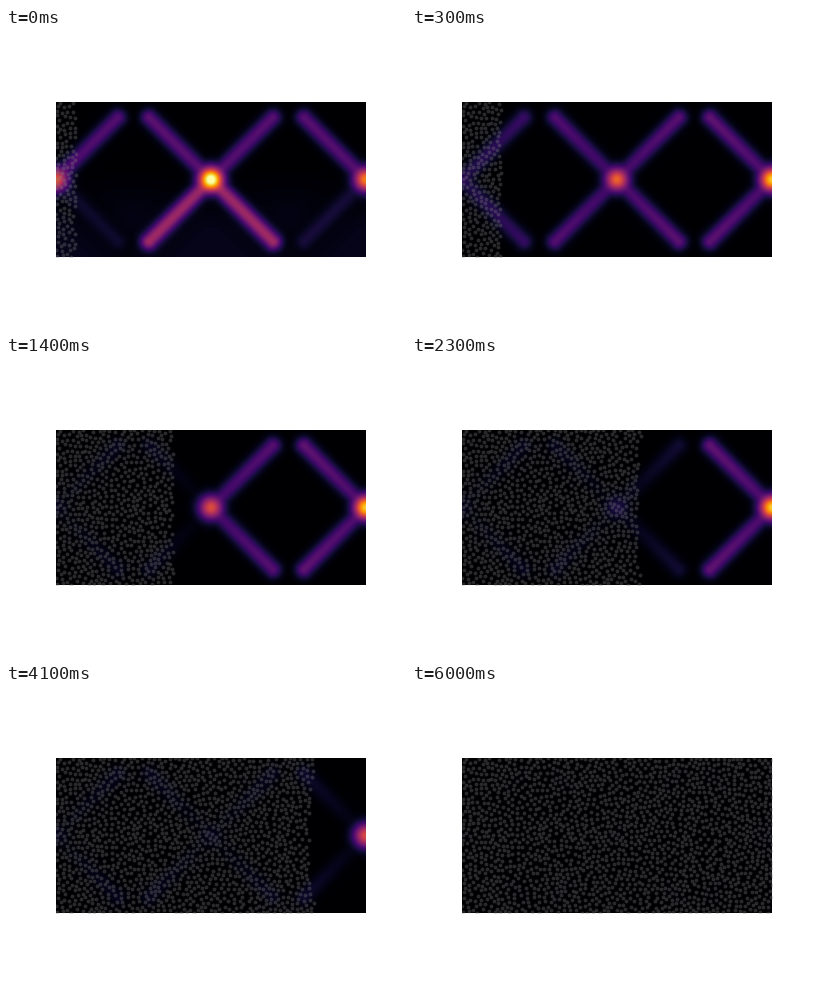
Write a matplotlib script that moves like this. It is 400 px wide and 300 px high and loops after 8000 ms.

```python
import random
import numpy as np
import matplotlib.pyplot as plt
from matplotlib.animation import FuncAnimation

LEFT, RIGHT, TOP, BOTTOM = 50, 360, 74, 229
CENTER, MID = (LEFT + RIGHT) / 2, (TOP + BOTTOM) / 2
FRAMES, STEP = 80, 100
BATCH = 19.4  # width in pixels of each new strip of dots

fig = plt.figure(figsize=(4, 3), dpi=100, facecolor="white")
ax = fig.add_axes([LEFT / 400, 1 - BOTTOM / 300,
                   (RIGHT - LEFT) / 400, (BOTTOM - TOP) / 300])
ax.set_xlim(LEFT, RIGHT)
ax.set_ylim(BOTTOM, TOP)
ax.axis("off")

X, Y = np.meshgrid(np.arange(LEFT, RIGHT) + 0.5, np.arange(TOP, BOTTOM) + 0.5)


def batches(tick):
    """Strips of dots laid so far; the pace slows to the right."""
    return np.interp(tick, [0, 8, 19, 30, 55], [0, 3, 7, 10, 15])


def edge_at(count):
    return 70 + BATCH * count


def fade(edge, x, width):
    return 1 / (1 + np.exp((edge - x) / width))


class Spot:
    """Bright knot that dims once the dots come near fade_x."""

    def __init__(self, x, start, level, fade_x):
        self.start, self.level, self.fade_x = start, level, fade_x
        self.shape = np.exp(-((X - x) ** 2 + (Y - MID) ** 2) / 12.5 ** 2)

    def light(self, edge, early, rest):
        amp = self.level + (self.start - self.level) * early
        return (amp * fade(edge, self.fade_x, 12) + rest) * self.shape


class Beam:
    """Diagonal arm from a knot, 62 pixels across and up (-1) or down (1)."""

    def __init__(self, x, side, down, start, level, fade_x):
        self.start, self.level, self.fade_x = start, level, fade_x
        dx, dy = X - x, Y - MID
        run = np.clip((dx * side + dy * down) / 2, 0, 62)
        self.along = run / 62
        self.dist = np.hypot(dx - side * run, dy - down * run)
        self.shape = np.exp(-(self.dist / 8.7) ** 2)

    def light(self, edge, early, rest):
        amp = self.level + (self.start - self.level) * early
        left = fade(edge, self.fade_x, 10)
        near = 0.25 + 0.55 * left + 0.15 * early
        taper = near + (1 - near) * self.along
        return (amp * left + rest) * taper * self.shape


spots = [Spot(LEFT, 0.66, 0.08, 90),
         Spot(CENTER, 0.97, 0.56, 202),
         Spot(RIGHT, 0.66, 0.82, 314)]

beams = [Beam(x, side, down, upper if down < 0 else lower, level, fade_x)
         for x, side, upper, lower, level, fade_x in [
             (LEFT, 1, 0.20, 0.03, 0.18, 100),
             (CENTER, -1, 0.21, 0.38, 0.19, 122),
             (CENTER, 1, 0.20, 0.38, 0.20, 212),
             (RIGHT, -1, 0.20, 0.05, 0.22, 286)]
         for down in (-1, 1)]

# floor glow near the bottom, dark around the beams
floor = 0.045 * np.clip((Y - 140) / 60, 0, 1)
for b in beams:
    floor = floor * (1 - np.exp(-(b.dist / 17) ** 2))


def field(tick):
    t = min(tick, 60)
    edge = edge_at(batches(t))
    early = np.exp(-t)
    rest = 0.05 * np.clip((62 - t) / 20, 0, 1)
    lights = [part.light(edge, early, rest) for part in spots + beams]
    return np.cbrt(sum(v ** 3 for v in lights)) + floor * early


def scatter_points(gap, tries=40000):
    """Random points that keep at least one gap apart."""
    rng = random.Random(4)
    cells = {}
    for _ in range(tries):
        x, y = rng.uniform(LEFT, RIGHT), rng.uniform(TOP, BOTTOM)
        cx, cy = int(x // gap), int(y // gap)
        near = (p for i in (-1, 0, 1) for j in (-1, 0, 1)
                for p in cells.get((cx + i, cy + j), ()))
        if all((x - px) ** 2 + (y - py) ** 2 > gap * gap for px, py in near):
            cells.setdefault((cx, cy), []).append((x, y))
    return np.array([p for cell in cells.values() for p in cell])


points = scatter_points(4.1)


def visible(tick):
    edge = edge_at(np.floor(batches(tick) + 1e-6))
    bow = 8 * np.clip((edge - 150) / 150, 0, 1)
    limit = edge + bow * ((points[:, 1] - MID) / 77) ** 2
    return points[points[:, 0] < limit]


image = ax.imshow(field(0), cmap="inferno", vmin=0, vmax=1, aspect="auto",
                  interpolation="nearest", extent=(LEFT, RIGHT, BOTTOM, TOP))
dots = ax.scatter([], [], s=8, color="gray", alpha=0.32, linewidths=0, zorder=3)


def draw(tick):
    image.set_data(field(tick))
    dots.set_offsets(visible(tick))
    return image, dots


anim = FuncAnimation(fig, draw, frames=FRAMES, interval=STEP,
                     repeat=True, repeat_delay=0)
plt.show()
```
